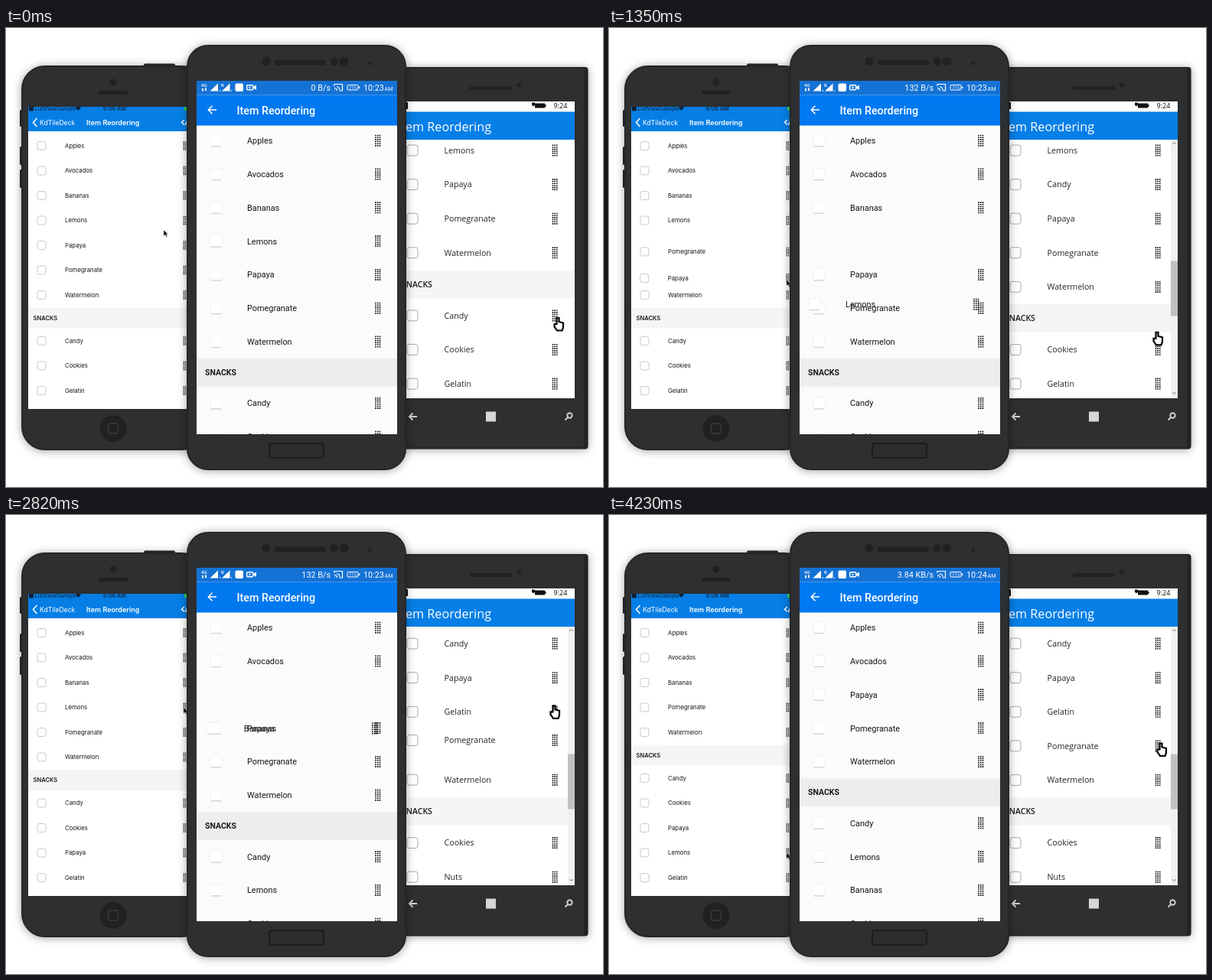
Write an HTML page that moves like this. It is 780x600 px and loops after 4.26 s.

```html
<!DOCTYPE html>
<html lang="en">
<head>
<meta charset="utf-8">
<title>Item Reordering</title>
<style>
html, body { margin: 0; width: 100%; height: 100%; overflow: hidden; background: #fff; }
svg { display: block; }
.body { fill: #2d2f31; stroke: #242628; stroke-width: 2; filter: drop-shadow(0 1px 6px rgba(0,0,0,.36)); }
.dark { fill: #1f2123; }
.keys { fill: #2a2c2e; }
.ios { font-family: Inter, "Liberation Sans", sans-serif; }
.droid { font-family: Roboto, "Liberation Sans", sans-serif; }
.win { font-family: "Open Sans", "Noto Sans", sans-serif; }
.white { fill: #fff; }
.line { fill: none; stroke: #fff; stroke-width: 1.5; }
.grip { fill: none; stroke: #000; }
.band text { font-weight: 600; fill: #1a1a1a; }
.row text { fill: #161616; }
.ios .box { fill: #fff; stroke: #c9c9c9; }
.win .box { fill: #fff; stroke: #a9a9a9; }
.win .row text { fill: #262626; }
.droid .box { fill: #fff; stroke: #e9e9e9; stroke-width: .6; }
.droid .lip { stroke: #cfcfcf; stroke-width: 1.2; }
.nav { fill: none; stroke: #d2d2d2; stroke-width: 1.9; }
</style>
</head>
<body>
<svg width="780" height="600" viewBox="0 0 780 600">
  <defs>
    <clipPath id="iosClip"><rect x="29" y="103" width="210" height="395"/></clipPath>
    <clipPath id="droidClip"><rect x="249" y="127" width="262" height="404"/></clipPath>
    <clipPath id="winClip"><rect x="522" y="146" width="221" height="338"/></clipPath>
    <clipPath id="winBar"><rect x="522" y="96" width="221" height="50"/></clipPath>
  </defs>

  <!-- left phone -->
  <g class="ios">
    <g class="keys">
      <rect x="180" y="46.5" width="41" height="5" rx="2"/>
      <rect x="18" y="107" width="4" height="22" rx="1.5"/>
      <rect x="18" y="155" width="4" height="24" rx="1.5"/>
      <rect x="18" y="185" width="4" height="24" rx="1.5"/>
    </g>
    <rect class="body" x="21" y="50" width="238" height="501" rx="30"/>
    <g class="dark">
      <circle cx="140" cy="71" r="4.5"/>
      <rect x="121" y="82" width="38" height="5" rx="2.5"/>
      <circle cx="140" cy="523.5" r="17.5"/>
    </g>
    <rect x="133.5" y="517" width="13" height="13" rx="3" fill="none" stroke="#3a3c3e" stroke-width="1.4"/>
    <rect class="white" x="29" y="103" width="210" height="395"/>
    <g clip-path="url(#iosClip)">
      <rect x="29" y="103" width="210" height="32" fill="#057fe5"/>
      <g font-size="7.3" fill="#0b2138">
        <rect x="30" y="102" width="6" height="6.5" rx="1"/>
        <text x="37.5" y="108.2">ListViewSample</text>
        <path d="M91 104q3.5-3 7 0l-3.5 4z"/>
        <text x="127" y="108.2" font-weight="500">6:06 AM</text>
      </g>
      <rect x="233" y="103" width="6" height="5" fill="#27d04c"/>
      <path class="line" d="M40.5 118l-5 5.5 5 5.5"/>
      <text class="white" x="44" y="126.7" font-size="8.6">KdTileDeck</text>
      <text class="white" x="105" y="126.7" font-size="9" font-weight="600">Item Reordering</text>
      <path class="line" d="M233 120l-3.5 3.2 3.5 3.2M234.5 127l3-8"/>
      <g id="iosList"></g>
      <path id="arrow" d="M0 0v8l2-1.7 1.4 3 1.3-.6-1.4-2.9h2.5z" fill="#111" stroke="#fff" stroke-width=".4"/>
    </g>
  </g>

  <!-- right phone -->
  <g class="win">
    <rect class="body" x="500" y="52" width="259.6" height="497.6" rx="3"/>
    <rect x="755" y="53" width="4.6" height="496" fill="#222426"/>
    <g class="dark">
      <rect x="606" y="76" width="55" height="5" rx="2.5"/>
      <circle cx="670" cy="75" r="3"/>
    </g>
    <rect class="white" x="522" y="96" width="221" height="388"/>
    <g clip-path="url(#winBar)">
      <rect x="522" y="97" width="3" height="9" fill="#111"/>
      <g fill="#111">
        <rect x="691" y="98.5" width="13" height="6"/>
        <rect x="704" y="100" width="1.5" height="3"/>
        <path d="M687 97.5h4v3l-2 2-2-2z"/>
        <text x="715.5" y="105" font-size="9">9:24</text>
      </g>
      <rect x="522" y="109.5" width="221" height="37" fill="#067fe7"/>
      <text class="white" x="634" y="135" font-size="16.2" text-anchor="end">Item Reordering</text>
    </g>
    <g clip-path="url(#winClip)">
      <g id="winList"></g>
      <g id="scroll">
        <rect x="734" y="145" width="9" height="339" fill="#f1f1f1"/>
        <rect id="thumb" x="734" y="304.5" width="9" height="72" fill="#c0c0c0"/>
        <path d="M736 152l2.5-2.5 2.5 2.5M736 476l2.5 2.5 2.5-2.5" fill="none" stroke="#777"/>
      </g>
    </g>
    <path class="nav" d="M537 508h-9.5M531.5 503.5l-4.500 4.500 4.500 4.500"/>
    <rect x="627" y="501.5" width="13" height="13" fill="#d6d6d6"/>
    <circle class="nav" cx="736.5" cy="506.5" r="3.2"/>
    <path class="nav" d="M734 509l-3.500 3.500"/>
    <path id="hand" d="M-3.500-8h3v5l5.500 1.500v6l-1.500 4h-6.500l-3.500-5v-3.500h3z" fill="#fff" stroke="#000" stroke-width="2.200"/>
  </g>

  <!-- middle phone -->
  <g class="droid">
    <rect class="body" x="237" y="23" width="285" height="554" rx="27"/>
    <g class="dark">
      <circle cx="340" cy="43.5" r="5.5"/>
      <rect x="351" y="41.5" width="67" height="7" rx="3.5"/>
      <circle cx="428.5" cy="43.5" r="5.2"/>
      <circle cx="441.5" cy="43.5" r="5.7"/>
      <circle cx="475.5" cy="46" r="2.5"/>
    </g>
    <rect x="344" y="543" width="71" height="19" rx="3" fill="#2a2c2e" stroke="#17191a" stroke-width="1.6"/>
    <rect x="249" y="69" width="262" height="462" fill="#fbfbfb"/>
    <rect x="249" y="69" width="262" height="18.5" fill="#1572d5"/>
    <rect x="249" y="87.5" width="262" height="40" fill="#0078f0"/>
    <g class="white">
      <text x="255" y="76.8" font-size="6" font-weight="500">4G</text>
      <path d="M257 78.5l1.5 1.5h-3zM261 82.5l-1.5-1.5h3zM256 80h2v2.5h-2zM260 78.5h2v2.5h-2z"/>
      <path d="M277 72.5v10h-10.5zM292.5 72.5v10h-10.5z"/>
      <circle cx="279.5" cy="82" r=".8"/><circle cx="294.5" cy="82" r=".8"/>
      <text x="281" y="77" font-size="6" font-weight="500">R</text>
      <rect x="299.5" y="72.5" width="10.5" height="10.5" rx="2"/>
      <text id="speed" x="424" y="82" font-size="10.8" text-anchor="end">0 B/s</text>
      <text id="clock" x="467" y="82" font-size="10.8">10:23</text>
      <text x="494.5" y="82" font-size="7.3">AM</text>
      <text x="448.3" y="80" font-size="5.5">71%</text>
      <path d="M323 77l4-2.5v6.5l-4-2.5z"/>
      <text x="301.5" y="112.6" font-size="14.3" font-weight="500">Item Reordering</text>
    </g>
    <g class="line">
      <rect x="314.7" y="74.8" width="8" height="6" rx="1"/>
      <circle cx="318.5" cy="77.8" r="1" stroke-width="1"/>
      <path stroke-width="1.2" d="M429 76v-2.5h10.500v8.500h-4M429 78.500q3.500 0 3.500 3.500M429 81h1M432 76.500q4 1 4 4.500"/>
      <rect x="446" y="74.5" width="14" height="6.5" rx="1" stroke-width="1"/>
      <path d="M461.5 76.5v2.5"/>
      <path d="M275 107h-10.5M269.5 101.8l-5.200 5.200 5.200 5.200"/>
    </g>
    <g clip-path="url(#droidClip)" id="droidList"></g>
  </g>
</svg>
<script>
const LOOP = 4260, STEP = 30, SLIDE = 200;
const $ = id => document.getElementById(id);
const fruits = ["Apples", "Avocados", "Bananas", "Lemons", "Papaya", "Pomegranate", "Watermelon"];
const snacks = ["Candy", "Cookies", "Gelatin", "Nuts"];

// Each drag carries a row into the slot of the row named in `past`.
// `wait` delays the rows it pushes aside, `lift` and `sway` shift it sideways.
const lists = [
  {
    root: $("iosList"), items: fruits, top: 154, bandY: 379, snackY: 409, step: 32.5,
    band: { x: 29, w: 210, h: 27, color: "#f5f5f5", textX: 35.5, size: 7.6 },
    row: { textX: 77, size: 7.8, boxX: 41, side: 11, round: 2.5, gripX: 232.2, gap: 2.1, gripH: 11.5 },
    drags: [
      { name: "Papaya", past: "Cookies", start: 1050, end: 1933, wait: .09, lift: 0, sway: -1 },
      { name: "Lemons", past: "Papaya", start: 3270, end: 3895, wait: .27, lift: 3, sway: -1 }
    ],
    cursor: { node: $("arrow"), from: [206, 264], x: 232, lead: 1.05 }
  },
  {
    root: $("droidList"), items: fruits, top: 147.2, bandY: 450.3, snackY: 490.4, step: 43.8,
    band: { x: 249, w: 262, h: 36.5, color: "#ededed", textX: 260, size: 10.5 },
    row: { textX: 315, size: 10.9, boxX: 267, side: 15, round: 1.5, gripX: 483, gap: 2.75, gripH: 15 },
    drags: [
      { name: "Lemons", past: "Candy", start: 747, end: 2069, wait: .39, lift: 3, sway: -23 },
      { name: "Bananas", past: "Lemons", start: 2480, end: 3950, wait: .34, lift: 0, sway: -24 }
    ]
  },
  {
    root: $("winList"), items: fruits.slice(3), top: 160, bandY: 334.8, snackY: 375.9, step: 44.6,
    band: { x: 522, w: 221, h: 36.5, color: "#f5f5f5", textX: 517, size: 10.5 },
    row: { textX: 572.5, size: 10.7, boxX: 524, side: 14, round: 3, gripX: 714.5, gap: 2.6, gripH: 15 },
    drags: [
      { name: "Candy", past: "Papaya", start: 100, end: 790, wait: .05, lift: 3, sway: 0 },
      { name: "Gelatin", past: "Pomegranate", start: 2328, end: 2690, wait: .36, lift: 3, sway: 0 }
    ],
    cursor: { node: $("hand"), from: [723, 387], x: 718, lead: 1.5, rest: { at: 3240, x: 723, y: 343 } },
    scroll: t => 36.5 * easeOut((t - 2640) / 60)
  }
];

const clamp = u => Math.max(0, Math.min(1, u));
const easeOut = u => 1 - (1 - clamp(u)) ** 2;
const smooth = u => (1 - Math.cos(Math.PI * clamp(u))) / 2;
const mix = (a, b, u) => a + (b - a) * u;
const progress = (drag, t) => clamp((t - drag.start) / (drag.end - drag.start)) ** 1.2;
const move = (node, x, y) => node.setAttribute("transform", `translate(${x} ${y})`);

function bandMarkup({ x, w, h, color, textX, size }) {
  return `<rect x="${x}" y="${-h / 2}" width="${w}" height="${h}" fill="${color}"/>
    <text x="${textX}" y="${size * .36}" font-size="${size}">SNACKS</text>`;
}

function rowMarkup(name, { textX, size, boxX, side, round, gripX, gap, gripH }) {
  const half = side / 2, dot = gripH / 9.5, space = (gripH - 6 * dot) / 5;
  const lines = [0, 1, 2].map(i => `M${gripX + i * gap} ${-gripH / 2}v${gripH}`).join("");
  return `<rect class="box" x="${boxX}" y="${-half}" width="${side}" height="${side}" rx="${round}"/>
    <path class="lip" d="M${boxX + 1} ${half}h${side - 2}"/>
    <text x="${textX}" y="${size * .36}" font-size="${size}">${name}</text>
    <path class="grip" d="${lines}" stroke-width="${dot}" stroke-dasharray="${dot} ${space}"/>`;
}

function build(list) {
  const parts = list.parts = {};
  const add = (name, y) => {
    const node = document.createElementNS("http://www.w3.org/2000/svg", "g");
    const isBand = name === "SNACKS";
    node.setAttribute("class", isBand ? "band" : "row");
    node.innerHTML = isBand ? bandMarkup(list.band) : rowMarkup(name, list.row);
    list.root.append(node);
    parts[name] = { node, y, slot: y, drags: [], slides: [] };
  };
  add("SNACKS", list.bandY);
  list.items.forEach((name, i) => add(name, list.top + i * list.step));
  snacks.forEach((name, i) => add(name, list.snackY + i * list.step));
  list.drags.forEach(drag => plan(list, drag));
}

// Works out how far a row is carried and when the rows it passes make room.
function plan({ parts, step }, drag) {
  const item = parts[drag.name];
  drag.from = item.slot;
  drag.dist = parts[drag.past].slot - item.slot;
  for (const part of Object.values(parts)) {
    const share = (part.slot - drag.from) / drag.dist;
    if (part === item || share < 0 || share > 1.01) continue;
    const dy = -Math.sign(drag.dist) * step;
    part.slides.push({ at: mix(drag.start, drag.end, drag.wait + .67 * share), dy });
    part.slot += dy;
  }
  item.slot = drag.from + drag.dist;
  item.drags.push(drag);
  item.node.parentNode.append(item.node);
}

function place({ node, y, drags, slides }, t) {
  let x = 0;
  for (const drag of drags) {
    const p = progress(drag, t);
    const held = clamp((t - drag.start) / 60) * (1 - clamp((t - drag.end) / 90));
    x += (drag.lift + drag.sway * p) * held;
    y += drag.dist * p;
  }
  for (const { at, dy } of slides) y += dy * easeOut((t - at) / SLIDE);
  move(node, x, y);
}

// The pointer glides to each row in turn, then leads it while dragging.
function point({ cursor, drags }, t, scrolled) {
  let [x, y] = cursor.from, begin = 0;
  for (const drag of drags) {
    const arrive = Math.min(begin + 600, drag.start);
    const u = smooth((t - begin) / (arrive - begin));
    x = mix(x, cursor.x, u);
    y = mix(y, drag.from, u) + drag.dist * Math.min(1, progress(drag, t) * cursor.lead);
    begin = drag.end + 150;
  }
  if (cursor.rest) {
    const u = smooth((t - cursor.rest.at) / 450);
    x = mix(x, cursor.rest.x, u);
    y = mix(y, cursor.rest.y, u);
  }
  move(cursor.node, x, y - scrolled);
}

function draw(t) {
  for (const list of lists) {
    const scrolled = list.scroll ? list.scroll(t) : 0;
    Object.values(list.parts).forEach(part => place(part, t));
    move(list.root, 0, -scrolled);
    if (list.cursor) point(list, t, scrolled);
    if (list.scroll) move($("thumb"), 0, scrolled * .22);
  }
  $("scroll").style.display = t < 90 ? "none" : "";
  $("speed").textContent = t < 300 ? "0 B/s" : t < 3480 ? "132 B/s" : "3.84 KB/s";
  $("clock").textContent = t < 3480 ? "10:23" : "10:24";
}

lists.forEach(build);
const begin = performance.now();
function tick() {
  const t = (performance.now() - begin) % LOOP;
  draw(Math.floor(t / STEP) * STEP);
  requestAnimationFrame(tick);
}
tick();
</script>
</body>
</html>
```
